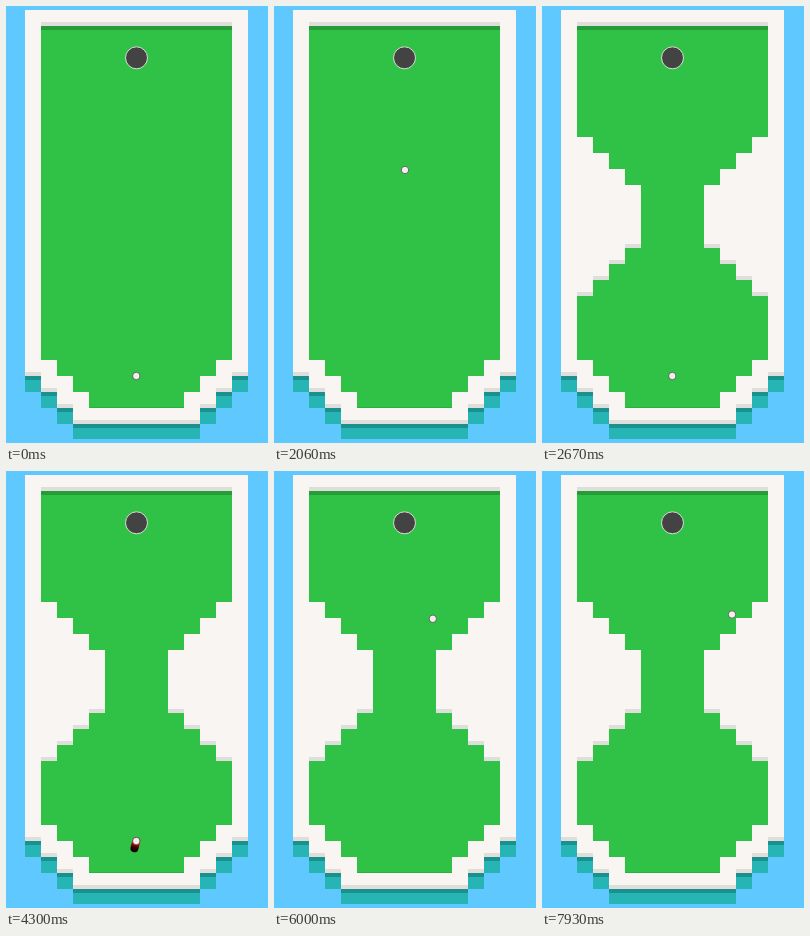
An HTML page for the animation above (8000 ms loop, 262 px wide and 437 px high).

```html
<!DOCTYPE html>
<html lang="en">
<head>
<meta charset="utf-8">
<title>Mini golf</title>
<style>
  html, body { margin: 0; width: 100%; height: 100%; overflow: hidden; background: #5fc9ff; }
  svg { display: block; width: 100%; height: 100%; }
  rect { shape-rendering: crispEdges; }
</style>
</head>
<body>
<svg viewBox="0 0 262 437">
  <defs>
    <linearGradient id="power" gradientUnits="userSpaceOnUse">
      <stop offset="0" stop-color="#ff0000"/>
      <stop offset=".15" stop-color="#ff0000"/>
      <stop offset="1" stop-color="#200000"/>
    </linearGradient>
  </defs>
  <g id="course"></g>
  <g id="walls"></g>
  <circle cx="130.5" cy="51.8" r="11" fill="#434343" stroke="#dbe3d6"/>
  <line id="stick" stroke="url(#power)" stroke-width="8" stroke-linecap="round"/>
  <circle id="ball" r="3.7" fill="#f3efec" stroke="#4b4f4b" stroke-width=".8"/>
</svg>
<script>
const LOOP = 8000, WIDTH = 261, TILE = 16, BOUNCE_Y = 28.5;
const WHITE = '#f9f5f2', GREY = '#dfdeda', GREEN = '#30c147', SHADE = '#269c39';
const TEAL = '#26b4b4', DEEP = '#18918f';
const TEE = [130.3, 370];
const el = id => document.getElementById(id);

function rect(parent, x, y, w, h, fill) {
  const r = document.createElementNS('http://www.w3.org/2000/svg', 'rect');
  for (const [k, v] of Object.entries({ x, y, width: w, height: h, fill })) r.setAttribute(k, v);
  parent.append(r);
}

// A wall tile column with a grey lower lip, drawn on both sides.
function column(parent, x, top, bottom, base) {
  for (const px of [x, WIDTH - x - TILE]) {
    rect(parent, px, top, TILE, bottom - top - 4, WHITE);
    rect(parent, px, bottom - 4, TILE, 4, GREY);
    if (base) {
      rect(parent, px, bottom, TILE, 4, DEEP);
      rect(parent, px, bottom + 4, TILE, 12, TEAL);
    }
  }
}

function build() {
  const course = el('course'), walls = el('walls');
  rect(course, 35, 20, 191, 382, GREEN);
  rect(course, 35, 20, 191, 4, SHADE);
  rect(course, 83, 401, 95, 1, '#2bb040');
  rect(course, 19, 4, 223, 12, WHITE);
  rect(course, 35, 16, 191, 4, GREY);
  column(course, 19, 4, 370, true);
  column(course, 35, 354, 386, true);
  column(course, 51, 370, 402, true);
  column(course, 67, 386, 418, false);
  rect(course, 67, 402, 127, 12, WHITE);
  rect(course, 67, 414, 127, 4, GREY);
  rect(course, 67, 418, 127, 4, DEEP);
  rect(course, 67, 422, 127, 11, TEAL);
  for (let i = 0; i < 4; i++) column(walls, 35 + TILE * i, 131 + TILE * i, 290 - TILE * i, false);
}

// Keys are [time, x, y, number of steps since the previous key].
const shots = [
  [[1580, ...TEE, 0], [2060, 131, 164, 6], [2380, 131.3, 98, 4], [2570, 131.4, 74, 2]],
  [[5560, ...TEE, 0], [6000, 158.8, 147.8, 6], [6300, 171, 51, 4],
   [7040, 184.9, -47.3, 8], [7170, 186, -53.5, 1], [7930, 190, -86.5, 10]]
];
const aims = [
  [[470, ...TEE, 0], [750, 130.3, 398, 4]],
  [[4200, ...TEE, 0], [4600, 123, 399, 4], [4740, 123, 399, 1],
   [4950, 125, 405, 3], [5060, 125, 405, 1], [5180, 126, 406, 2]]
];

// Finds the active key and the stepped progress towards the next one.
function locate(keys, t) {
  const last = keys.length - 1;
  if (t >= keys[last][0]) return [last - 1, 1];
  let i = 0;
  while (t >= keys[i + 1][0]) i++;
  const n = keys[i + 1][3];
  const u = (t - keys[i][0]) / (keys[i + 1][0] - keys[i][0]);
  return [i, Math.max(0, Math.floor(u * n + 1e-6) / n)];
}

function linear(keys, t) {
  const [i, u] = locate(keys, t);
  return [1, 2].map(c => keys[i][c] + (keys[i + 1][c] - keys[i][c]) * u);
}

function smooth(keys, t) {
  const [i, u] = locate(keys, t), last = keys.length - 1;
  const span = j => keys[j + 1][0] - keys[j][0];
  return [1, 2].map(c => {
    const rate = j => (keys[j + 1][c] - keys[j][c]) / span(j);
    const slope = j =>
      j === 0 ? 2 * rate(0) - slope(1) :
      j === last ? rate(j - 1) :
      (rate(j - 1) * span(j) + rate(j) * span(j - 1)) / (span(j - 1) + span(j));
    const a = keys[i][c], b = keys[i + 1][c], h = span(i), v = 1 - u;
    return a * (1 + 2 * u) * v * v + b * u * u * (3 - 2 * u)
      + h * u * v * (slope(i) * v - slope(i + 1) * u);
  });
}

function set(node, attrs) {
  for (const k in attrs) node.setAttribute(k, attrs[k]);
}

function render(t) {
  const hole = t < 2670 ? 0 : 1;
  const shot = shots[hole], aim = aims[hole];
  el('walls').style.display = hole ? '' : 'none';

  const [x, y] = t < shot[0][0] ? TEE : smooth(shot, t);
  set(el('ball'), { cx: x, cy: BOUNCE_Y + Math.abs(y - BOUNCE_Y) });

  const [tipX, tipY] = linear(aim, t);
  const aiming = t < shot[0][0] && tipY > TEE[1];
  const line = { x1: TEE[0], y1: TEE[1], x2: tipX, y2: tipY };
  el('stick').style.display = aiming ? '' : 'none';
  if (aiming) {
    set(el('stick'), { ...line, x2: tipX + 0.01 });
    set(el('power'), line);
  }
}

build();
render(0);
const start = performance.now();
(function frame() {
  render((performance.now() - start) % LOOP);
  requestAnimationFrame(frame);
})();
</script>
</body>
</html>
```
